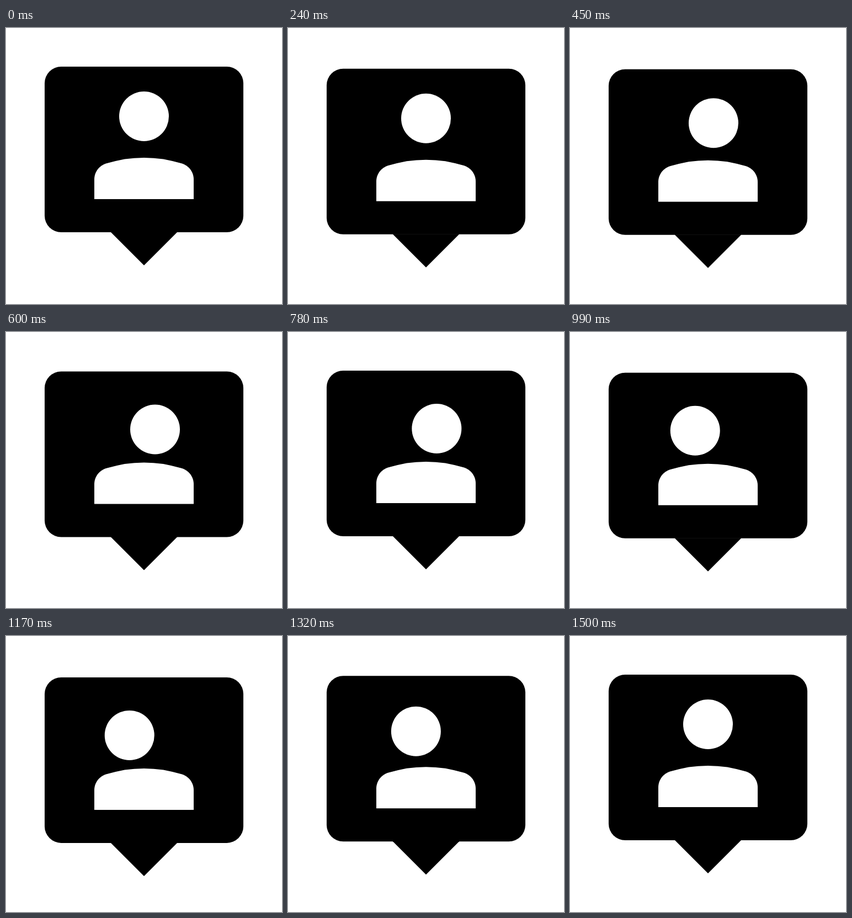
Recreate the animation shown at these times as an HTML page. Size 500 by 500 pixels, loop 1530 ms.

```html
<!DOCTYPE html>
<html lang="en">
<head>
<meta charset="utf-8">
<title>Profile bubble</title>
<style>
  html, body { margin: 0; height: 100%; overflow: hidden; background: #fff; }
  svg { display: block; width: 100%; height: 100%; }
</style>
</head>
<body>
<svg viewBox="0 0 500 500">
  <g id="bubble">
    <rect x="70" y="70" width="360" height="300" rx="30"/>
    <path d="M190 369.5V370L250 430L310 370V369.5Z"/>
    <g fill="#fff">
      <path d="M160 310V274C160 261 169 249 182 245.3Q199 240.5 215 237.5Q250 232.5 285 237.5Q301 240.5 318 245.3C331 249 340 261 340 274V310Z"/>
      <circle id="head" r="45"/>
    </g>
  </g>
</svg>
<script>
const LOOP = 1530, STEP = 30, BOB = 750;
const bubble = document.getElementById('bubble');
const head = document.getElementById('head');

// Head stops: [move start, move end, x, y]
const moves = [
  [300, 600, 270, 175],
  [750, 1050, 223.75, 175],
  [1200, 1500, 250, 160],
];

// Closed form of cubic-bezier(.5, 0, .5, 1)
function ease(u) {
  const w = Math.min(1, Math.max(0, u)) - 0.5;
  const v = Math.sinh(Math.asinh(4 * w) / 3);
  return 0.5 + 1.5 * v - 2 * v ** 3;
}

function draw(t) {
  const phase = (t % BOB) / (BOB / 2);
  const drop = 5 * ease(phase < 1 ? phase : 2 - phase);
  bubble.setAttribute('transform', `translate(0 ${t < 2 * BOB ? drop : 0})`);

  let x = 250, y = 160;
  for (const [start, end, toX, toY] of moves) {
    const k = ease((t - start) / (end - start));
    x += (toX - x) * k;
    y += (toY - y) * k;
  }
  head.setAttribute('cx', x);
  head.setAttribute('cy', y);
}

const origin = performance.now();
function tick() {
  const t = (performance.now() - origin) % LOOP;
  draw(Math.floor(t / STEP) * STEP);
  requestAnimationFrame(tick);
}
tick();
</script>
</body>
</html>
```
